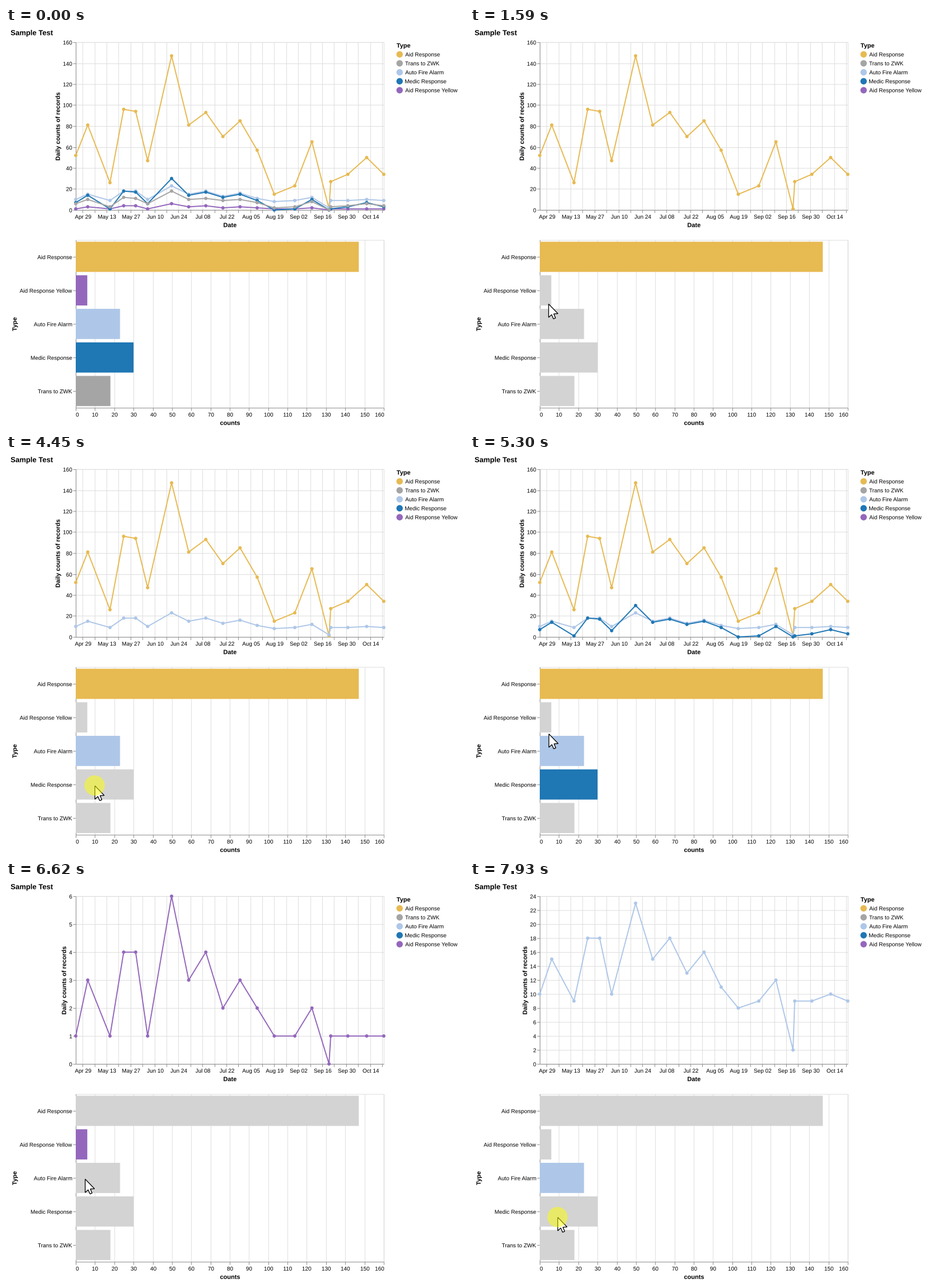
A matplotlib script that plays this animation: 801 px wide and 699 px high, repeating every 8000 ms.

```python
import matplotlib.pyplot as plt
import numpy as np
from matplotlib.animation import FuncAnimation
from matplotlib.patches import Circle, PathPatch, Polygon, Rectangle
from matplotlib.textpath import TextPath
from matplotlib.transforms import Affine2D

W, H, DPI = 801, 699, 64
LOOP, STEP, HOP = 8000, 40, 77
S = 0.9795                       # pixels per chart unit
WIDTH, HEIGHT = 550, 300         # plot size in chart units
X0, LINE_Y, BAR_Y = 122.0, 24.9, 371.5
GRID, AXIS, MUTED = "#dddddd", "#888888", "#d3d3d3"
MONTHS = "Jan Feb Mar Apr May Jun Jul Aug Sep Oct Nov Dec".split()

AID, YELLOW, AUTO, MEDIC, TRANS = NAMES = [
    "Aid Response", "Aid Response Yellow", "Auto Fire Alarm", "Medic Response", "Trans to ZWK"]
LEGEND = [AID, TRANS, AUTO, MEDIC, YELLOW]
COLORS = dict(zip(NAMES, ["#e7ba52", "#9467bd", "#aec7e8", "#1f77b4", "#a5a5a5"]))

days = np.cumsum([0, 7, 13, 8, 7, 7, 14] + [10] * 6 + [12, 10, 10, 1, 10, 11, 10])
aid = np.array([52, 81, 26, 96, 94, 47, 147, 81, 93, 70,
                85, 57, 15, 23, 65, 1, 27, 34, 50, 34])
# The smaller series follow the largest one.
COUNTS = {
    AID: aid,
    YELLOW: np.maximum(0.0545 * aid - 1.56, aid > 1).round(),
    AUTO: np.minimum(8 + 15 / (1 + np.exp((82 - aid) / 18)), 2 * aid).round(),
    MEDIC: np.maximum(0.236 * aid - 4.9, 0).round(),
    TRANS: (0.12 * aid + 0.2).round(),
}
SCALES = {160: 20, 24: 2, 6: 1}  # axis maximum: tick step

CLICKS = [(1030, [AID]), (3220, [AID, AUTO]), (4450, [AID, AUTO, MEDIC]),
          (5850, [YELLOW]), (6850, [AUTO]), (7930, [MEDIC])]
CHANGE_DELAY, HALO_TIME = 80, 100
ENTER, ENTRY = 110, (499, 592)
# Pointer moves: start, end, destination.
MOVES = [
    (200, 200, 401, 532), (410, 490, 328, 412), (720, 800, 329, 401),
    (1420, 1590, 137, 483), (1950, 2120, 134, 474), (2500, 2670, 144, 519),
    (3670, 3830, 151, 537), (3980, 4150, 155, 579), (4990, 5680, 133, 465),
    (6310, 6620, 138, 520), (7150, 7550, 149, 606), (7690, 7850, 153, 587),
]
ARROW = np.array([(0.5, 0.5), (0.5, 24), (5.7, 19.2), (9, 26.6),
                  (12.6, 25), (9.5, 17.8), (16.8, 17.4)])

fig = plt.figure(figsize=(W / DPI, H / DPI), dpi=DPI, facecolor="white")
ax = fig.add_axes([0, 0, 1, 1])
ax.set_xlim(0, W)
ax.set_ylim(H, 0)
ax.axis("off")


def pt(pixels):
    return pixels * 72 / DPI


def mark(origin, units):
    """Pixel position of a data mark."""
    return origin + S * np.asarray(units)


def rule(origin, units):
    """Pixel position of a grid line or tick, on whole chart units."""
    return origin + S * (np.round(units) + 0.5)


def label(x, y, text, size=10, ha="center", bold=False, angle=0):
    """Text whose capitals are centred on the given point."""
    font = {"family": "Liberation Sans", "weight": "bold" if bold else "normal"}
    path = TextPath((0, 0), text, size=size * S, prop=font)
    box = path.get_extents()
    anchor = {"left": box.x0, "center": (box.x0 + box.x1) / 2, "right": box.x1}[ha]
    place = Affine2D().translate(-anchor, -0.358 * size * S).rotate_deg(angle)
    place.scale(1, -1).translate(x, y)
    return ax.add_patch(PathPatch(place.transform_path(path), fc="black", lw=0, snap=False))


def vlines(xs, y0, y1, color):
    return ax.vlines(xs, y0, y1, colors=color, linewidths=pt(S), snap=False,
                     zorder=1 if color == GRID else 2)


def hlines(ys, x0, x1, color):
    return ax.hlines(ys, x0, x1, colors=color, linewidths=pt(S), snap=False,
                     zorder=1 if color == GRID else 2)


LEFT, RIGHT = rule(X0, 0), rule(X0, WIDTH)
MIDDLE = (LEFT + RIGHT) / 2
TICK = 5 * S
LABEL_X = LEFT - 7.2 * S


def build_frame(y0, xs, title):
    """Vertical grid, bottom ticks and axis lines of one plot."""
    top, bottom = rule(y0, 0), rule(y0, HEIGHT)
    vlines(xs, top, bottom, GRID)
    vlines([RIGHT], top, bottom, GRID)
    hlines([top], LEFT, RIGHT, GRID)
    vlines(xs, bottom, bottom + TICK, AXIS)
    vlines([LEFT], top, bottom, AXIS)
    hlines([bottom], LEFT, RIGHT, AXIS)
    label(MIDDLE, bottom + 25.7, title, 11, bold=True)


def build_dates():
    offsets = np.arange(4, 180, 7)
    xs = rule(X0, offsets * WIDTH / 180)
    build_frame(LINE_Y, xs, "Date")
    first = np.datetime64("2019-04-25")
    for x, offset in zip(xs[::2], offsets[::2]):
        _, month, day = str(first + offset).split("-")
        label(x + 0.4, 330.5, f"{MONTHS[int(month) - 1]} {day}")


def build_value_axis(top, step):
    ticks = np.arange(0, top + 1, step)
    ys = rule(LINE_Y, HEIGHT * (1 - ticks / top))
    parts = [hlines(ys, LEFT, RIGHT, GRID), hlines(ys, LEFT - TICK, LEFT, AXIS)]
    parts += [label(LABEL_X, y, str(tick), ha="right") for tick, y in zip(ticks, ys)]
    title_x = 90.4 + 5.44 * (3 - len(str(top)))
    parts.append(label(title_x, rule(LINE_Y, HEIGHT / 2), "Daily counts of records",
                       11, bold=True, angle=90))
    return parts


def build_bars():
    ticks = np.arange(0, 161, 10)
    xs = rule(X0, ticks * WIDTH / 160)
    build_frame(BAR_Y, xs, "counts")
    for tick, x in zip(ticks, xs):
        label(x, 677.2, str(tick), ha={0: "left", 160: "right"}.get(tick, "center"))
    label(14.8, rule(BAR_Y, HEIGHT / 2), "Type", 11, bold=True, angle=90)

    bars = {}
    band = HEIGHT / len(NAMES)
    for i, name in enumerate(NAMES):
        y = rule(BAR_Y, band * (i + 0.5))
        hlines([y], LEFT - TICK, LEFT, AXIS)
        label(LABEL_X, y, name, ha="right")
        corner = X0, mark(BAR_Y, band * (i + 0.05))
        length = S * WIDTH * max(COUNTS[name]) / 160
        bars[name] = ax.add_patch(Rectangle(corner, length, 0.9 * band * S,
                                            lw=0, snap=False, zorder=3))
    return bars


def build_series(name, top):
    """Line with its dots."""
    color = COLORS[name]
    xs = mark(X0, days * WIDTH / 180)
    ys = mark(LINE_Y, HEIGHT * (1 - COUNTS[name] / top))
    parts = ax.plot(xs, ys, color=color, lw=pt(2 * S), zorder=4, snap=False,
                    solid_joinstyle="miter", solid_capstyle="butt")
    parts += [ax.add_patch(Circle(p, 3 * S, fc=color, lw=0, zorder=5)) for p in zip(xs, ys)]
    return parts


def build_legend():
    label(683.2, 30.4, "Type", 11, "left", True)
    for i, name in enumerate(LEGEND):
        y = 46.2 + 15.7 * i
        ax.add_patch(Circle((688.4, y), 5.6, fc=COLORS[name], lw=0))
        label(698.2, y, name, ha="left")


def scale_for(chosen):
    peak = max(max(COUNTS[name]) for name in chosen)
    return min(top for top in SCALES if top >= peak)


label(8.4, 8, "Sample Test", 13, "left", True)
build_dates()
build_legend()
bars = build_bars()
value_axes = {top: build_value_axis(top, step) for top, step in SCALES.items()}
series = {(name, top): build_series(name, top)
          for name in NAMES for top in {160, scale_for([name])}}

pointer = ax.add_patch(Polygon(ARROW, closed=True, fc="white", ec="black",
                               lw=pt(1.3), zorder=8))
halo = ax.add_patch(Circle((0, 0), 17.8, fc="#ffff00", alpha=0.5, lw=0, zorder=9))


def pointer_at(t):
    """Pointer tip at time t, moving in eased hops."""
    pos = np.array(ENTRY, float)
    for start, end, x, y in MOVES:
        if t < start:
            break
        hops = round((end - start) / HOP) + 1
        done = min(int((t - start) / HOP) + 1, hops)
        pos += (np.array([x, y]) - pos) * (1 - (1 - done / hops) ** 2.3)
    return pos


def show_selection(chosen):
    scale = scale_for(chosen)
    for top, parts in value_axes.items():
        plt.setp(parts, visible=top == scale)
    for (name, top), parts in series.items():
        plt.setp(parts, visible=name in chosen and top == scale)
    for name, bar in bars.items():
        bar.set_facecolor(COLORS[name] if name in chosen else MUTED)


def draw(i):
    t = i * STEP + 30
    chosen = NAMES
    for press, names in CLICKS:
        if t >= press + CHANGE_DELAY:
            chosen = names
    show_selection(chosen)
    tip = pointer_at(t)
    pointer.set_xy(ARROW + tip)
    pointer.set_visible(t >= ENTER)
    halo.center = tuple(tip)
    halo.set_visible(any(0 <= t - press < HALO_TIME for press, _ in CLICKS))
    return []


anim = FuncAnimation(fig, draw, frames=LOOP // STEP, interval=STEP,
                     init_func=lambda: draw(0), repeat=True, repeat_delay=0)
plt.show()
```
